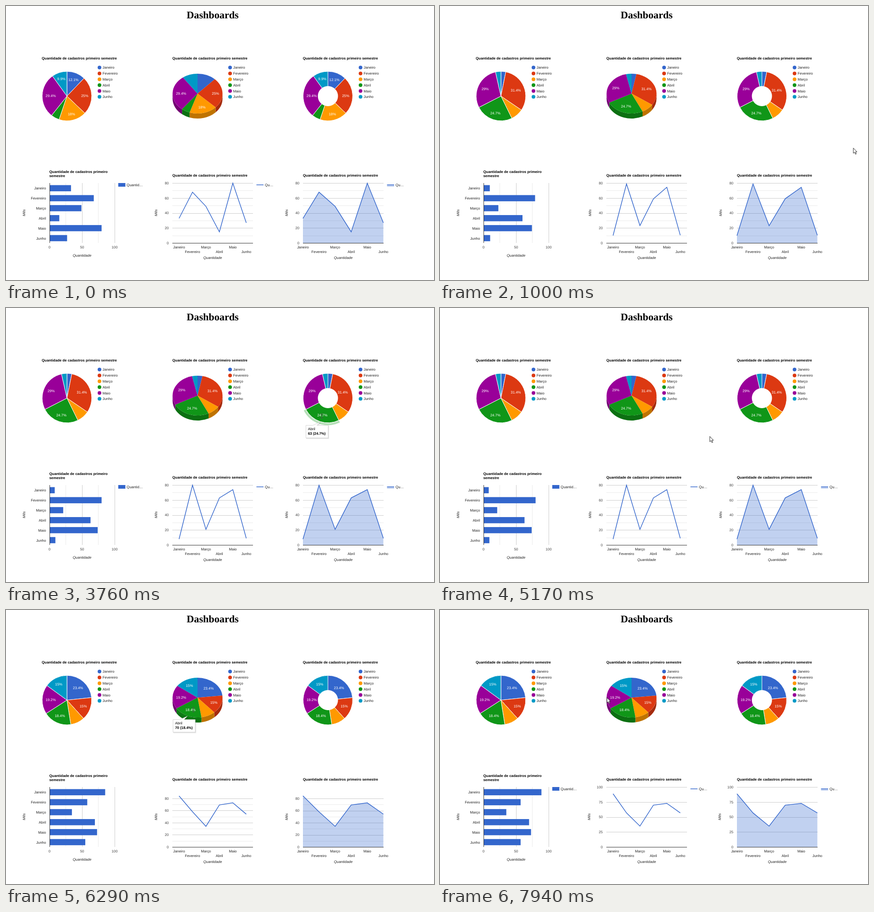
Write an HTML page that moves like this. It is 934x599 px and loops after 8 s.

```html
<!DOCTYPE html>
<html lang="pt">
<head>
<meta charset="utf-8">
<title>Dashboards</title>
<style>
html, body { margin: 0; width: 100%; height: 100%; overflow: hidden; background: #fff; }
svg { display: block; width: 934px; height: 599px; font: 7.85px Arial, "Liberation Sans", sans-serif; text-rendering: geometricPrecision; }
h1, .head { font: bold 22.2px "Times New Roman", "Liberation Serif", serif; }
.title { font-weight: bold; }
.axis { font-style: italic; }
</style>
</head>
<body>
<svg id="stage" viewBox="0 0 934 599"></svg>
<script>
const LOOP = 8000, GROW = 1290, TAU = Math.PI * 2;
const months = ['Janeiro', 'Fevereiro', 'Março', 'Abril', 'Maio', 'Junho'];
const colors = ['#3366cc', '#dc3912', '#ff9900', '#109618', '#990099', '#0099c6'];
const shades = ['#264d99', '#a52b0e', '#bf7300', '#0c7012', '#730073', '#007395'];
const heading = 'Quantidade de cadastros primeiro semestre';
const blue = colors[0];

// Each data set: when it shows up, when its bars start to grow, axis maximum
const sets = [
  { at: 0, start: -GROW * 2, max: 80, data: [33, 68, 49, 15, 80, 27] },
  { at: 310, start: 230, max: 80, data: [8, 80, 21, 63, 74, 9] },
  { at: 5450, start: 5453, max: 100, data: [89, 57, 35, 70, 73, 57] }
];

const pointerPath = [
  [440, 922, 622], [510, 914, 595], [1070, 900, 270], [1230, 866, 148], [1300, 854, 164],
  [1370, 840, 207], [1780, 638, 301], [1850, 605, 285], [1920, 591, 251], [2270, 662, 200],
  [3060, 662, 200], [3690, 689, 236], [4830, 689, 236], [5400, 521, 310], [5660, 521, 310],
  [6220, 409, 218], [7190, 409, 218], [7500, 326, 238], [7940, 364, 191]
];

const pies = [
  { cx: 133, cy: 197, rx: 54, ry: 54, left: 78, least: .095 },
  { cx: 418, cy: 191.5, rx: 54.5, ry: 43.5, left: 363, least: .13, depth: 11 },
  { cx: 702.5, cy: 197, rx: 54, ry: 54, left: 647.7, least: .095, hole: 22 }
];

// Hovered slices: time span, pie, slice
const hovers = [[2130, 3270, 2, 4], [3270, 4960, 2, 3], [6130, 7320, 1, 3]];

const n2 = v => +v.toFixed(2);
const text = (x, y, s, fill = '#222', anchor = 'start', extra = '') =>
  `<text x="${n2(x)}" y="${n2(y + 2.8)}" fill="${fill}" text-anchor="${anchor}" ${extra}>${s}</text>`;
const title = (x, y, s = heading) => text(x, y, s, '#000', 'start', 'class="title"');
const line = (x1, y1, x2, y2, color, w = 1) =>
  `<path d="M${n2(x1)} ${n2(y1)}L${n2(x2)} ${n2(y2)}" stroke="${color}" stroke-width="${w}"/>`;
const rect = (x, y, w, h, fill, extra = '') =>
  `<rect x="${n2(x)}" y="${n2(y)}" width="${n2(w)}" height="${n2(h)}" fill="${fill}" ${extra}/>`;
const path = (d, fill, extra = '') => `<path d="${d}" fill="${fill}" ${extra}/>`;

function rim(p, turn, grow = 0, drop = 0) {
  const a = turn * TAU;
  return [p.cx + (p.rx + grow) * Math.sin(a), p.cy - (p.ry + grow) * Math.cos(a) + drop];
}
const pt = q => q.map(n2).join(' ');

function arc(p, from, to, grow = 0, drop = 0) {
  const sweep = to > from ? 1 : 0, big = Math.abs(to - from) > .5 ? 1 : 0;
  return `A${p.rx + grow} ${p.ry + grow} 0 ${big} ${sweep} ${pt(rim(p, to, grow, drop))}`;
}

function slices(data) {
  const total = data.reduce((a, b) => a + b);
  let sum = 0;
  return data.map(value => {
    const from = sum / total;
    sum += value;
    return { value, from, to: sum / total, part: value / total };
  });
}
const percent = part => +(part * 100).toFixed(1) + '%';

// Pushes the label outwards until its far corner meets the inset rim
function sliceLabel(p, s) {
  const label = percent(s.part), a = (s.from + s.to) * Math.PI;
  const hw = (label.length - 1 - label.includes('.')) * 2.18 + 3.5 + (label.includes('.') ? 1.1 : 0);
  const RX = p.rx - 7.1, RY = p.ry - 7.1, k = RY / RX;
  const ux = Math.sin(a), uy = -Math.cos(a) * k;
  const ax = Math.abs(ux) / RX, ay = Math.abs(uy) / RY, bx = hw / RX, by = 4 / RY;
  const A = ax * ax + ay * ay, B = ax * bx + ay * by, C = bx * bx + by * by - 1;
  const d = (-B + Math.sqrt(B * B - A * C)) / A;
  return text(p.cx + ux * d, p.cy + uy * d, label, '#fff', 'middle');
}

function pie(p, parts, hovered) {
  let out = title(p.left, 114);
  months.forEach((m, i) => {
    const y = 134.6 + i * 12.8;
    out += `<circle cx="${p.left + 126}" cy="${y}" r="4" fill="${colors[i]}"/>` + text(p.left + 132.8, y, m);
  });
  if (p.depth) parts.forEach((s, i) => {
    const from = Math.max(s.from, .25), to = Math.min(s.to, .75);
    if (to > from) out += path(`M${pt(rim(p, from))}${arc(p, from, to)}L${pt(rim(p, to, 0, p.depth))}${arc(p, to, from, 0, p.depth)}Z`, shades[i]);
  });
  const stroke = p.depth ? '' : 'stroke="#fff"';
  parts.forEach((s, i) => {
    out += path(`M${p.cx} ${p.cy}L${pt(rim(p, s.from))}${arc(p, s.from, s.to)}Z`, colors[i], stroke);
  });
  if (p.hole) out += `<circle cx="${p.cx}" cy="${p.cy}" r="${p.hole}" fill="#fff"/>`;
  if (hovered >= 0) {
    const s = parts[hovered];
    out += path(`M${pt(rim(p, s.from, 3))}${arc(p, s.from, s.to, 3)}`, 'none', `stroke="${colors[hovered]}" stroke-opacity=".3" stroke-width="4.5"`);
  }
  parts.forEach(s => { if (s.part > p.least) out += sliceLabel(p, s); });
  return out;
}

function tooltip(p, s, name) {
  const [ax, ay] = rim(p, (s.from + s.to) / 2);
  const value = `${s.value} (${percent(s.part)})`;
  const x = Math.round(ax - 31.5) + .5, y = Math.round(ay + 8) + .5;
  const w = 10 + value.length * 3.85, h = 27.5;
  const d = `M${x} ${y}H${x + 15}L${n2(ax)} ${n2(ay + 1)}L${x + 24} ${y}H${n2(x + w)}V${y + h}H${x}Z`;
  return path(d, '#000', 'opacity=".1" transform="translate(1.2 1.4)" stroke="#000" stroke-width="1.5"') +
    path(d, '#fff', 'stroke="#ccc" stroke-width=".8" stroke-linejoin="round"') +
    text(x + 4.5, y + 8, name, '#000') + title(x + 4.5, y + 18, value);
}

function barChart(s) {
  const x0 = 95, unit = 1.42;
  let out = title(x0 - .5, 361.7, 'Quantidade de cadastros primeiro') + title(x0 - .5, 371.6, 'semestre');
  for (let v = 25; v <= 100; v += 25) {
    const x = Math.floor(x0 + v * unit) + .5;
    out += line(x, 387, x, 518, v % 50 ? '#ebebeb' : '#ccc');
  }
  s.values.forEach((v, i) => {
    const y = 387 + 131 / 6 * (i + .5);
    out += rect(x0, y + .4 - 6.75, v * unit, 13.5, blue) + text(87.3, y + .7, months[i], '#222', 'end');
  });
  out += line(x0 + .5, 387, x0 + .5, 518, '#333');
  [0, 50, 100].forEach(v => { out += text(x0 + v * unit, 527, v, '#444', 'middle'); });
  out += text(166, 545, 'Quantidade', '#222', 'middle', 'class="axis"') + verticalName(39);
  if (s.done) out += rect(245, 387, 15.5, 8, blue) + text(263.3, 391, 'Quantid…');
  return out;
}

const verticalName = x =>
  text(0, 0, 'Mês', '#222', 'middle', `class="axis" transform="translate(${x} 452) rotate(-90)"`);

function trendChart(left, s, filled) {
  const right = left + 176, base = 518, unit = 131 / s.max;
  const wide = s.done && s.max === 100, step = wide ? 25 : 20;
  const gap = filled ? 35.1 : 176 / 6, first = filled ? left : left + gap / 2;
  let out = title(left, 370);
  for (let v = 0; v <= (wide ? 100 : 80); v += wide ? 25 : 10) {
    const y = base - v * unit, major = v % step === 0;
    out += line(left, Math.round(y) + .5, right, Math.round(y) + .5, v ? (major ? '#ccc' : '#ebebeb') : '#333');
    if (major) out += text(left - 7.8, y, v, '#444', 'end');
  }
  const points = s.values.map((v, i) => pt([first + gap * i, base + .3 - v * unit])).join('L');
  if (filled) out += path(`M${left} ${base}L${points}V${base}Z`, blue, 'fill-opacity=".3"');
  out += path('M' + points, 'none', `stroke="${blue}" stroke-width="1.45"`);
  months.forEach((m, i) => { out += text(first + gap * i, i % 2 ? 537.5 : 527.2, m, '#222', 'middle'); });
  out += text(left + 88, 550, 'Quantidade', '#222', 'middle', 'class="axis"') + verticalName(left - (wide ? 38 : 36));
  if (s.done) {
    const x = left + 183.5;
    if (filled) out += rect(x, 391, 15.5, 4, blue, 'fill-opacity=".3"');
    out += line(x, 391, x + 15.5, 391, blue, 1.45) + text(x + 18.6, 391, 'Qu…');
  }
  return out;
}

function stateAt(t, delay) {
  const i = sets.findLastIndex(s => t >= s.at), to = sets[i], from = sets[Math.max(0, i - 1)];
  const k = Math.min(1, Math.max(0, (t - to.start - delay) / GROW));
  const e = 1 - (1 - k) ** 3, mix = (a, b) => a + (b - a) * e;
  return {
    target: to.data, done: k === 1, max: mix(from.max, to.max),
    values: to.data.map((v, j) => mix(from.data[j], v))
  };
}

function pointer(t) {
  if (t < pointerPath[0][0]) return '';
  const i = pointerPath.findIndex(q => q[0] > t);
  const b = pointerPath[i < 0 ? pointerPath.length - 1 : i], a = i < 0 ? b : pointerPath[i - 1];
  const k = b === a ? 1 : (t - a[0]) / (b[0] - a[0]);
  const x = a[1] + (b[1] - a[1]) * k, y = a[2] + (b[2] - a[2]) * k;
  const overText = (t > 3660 && t < 4850) || (t > 6200 && t < 7210);
  const shape = overText
    ? path('M-2.5-5Q0-5 0-3.5Q0-5 2.5-5M0-4V4M-2.5 5Q0 5 0 3.5Q0 5 2.5 5', 'none', 'stroke="#555" stroke-width="1"')
    : path('M.3.5V12L3 9.6L4.9 14L6.8 13.2L4.9 8.9H8.3Z', '#fff', 'stroke="#111" stroke-width=".9"');
  return `<g transform="translate(${n2(x)} ${n2(y)})">${shape}</g>`;
}

const stage = document.getElementById('stage');

function render(t) {
  const bars = stateAt(t, 0), parts = slices(bars.target);
  const hover = hovers.find(h => t >= h[0] && t < h[1]);
  let out = '<text x="451" y="27" text-anchor="middle" class="head">Dashboards</text>';
  pies.forEach((p, i) => { out += pie(p, parts, hover && hover[2] === i ? hover[3] : -1); });
  out += barChart(bars) + trendChart(363, stateAt(t, 45), false) + trendChart(648, stateAt(t, 35), true);
  if (hover) out += tooltip(pies[hover[2]], parts[hover[3]], months[hover[3]]);
  stage.innerHTML = out + pointer(t);
}

const begin = performance.now();
function tick() {
  render((performance.now() - begin) % LOOP);
  requestAnimationFrame(tick);
}
tick();
</script>
</body>
</html>
```
